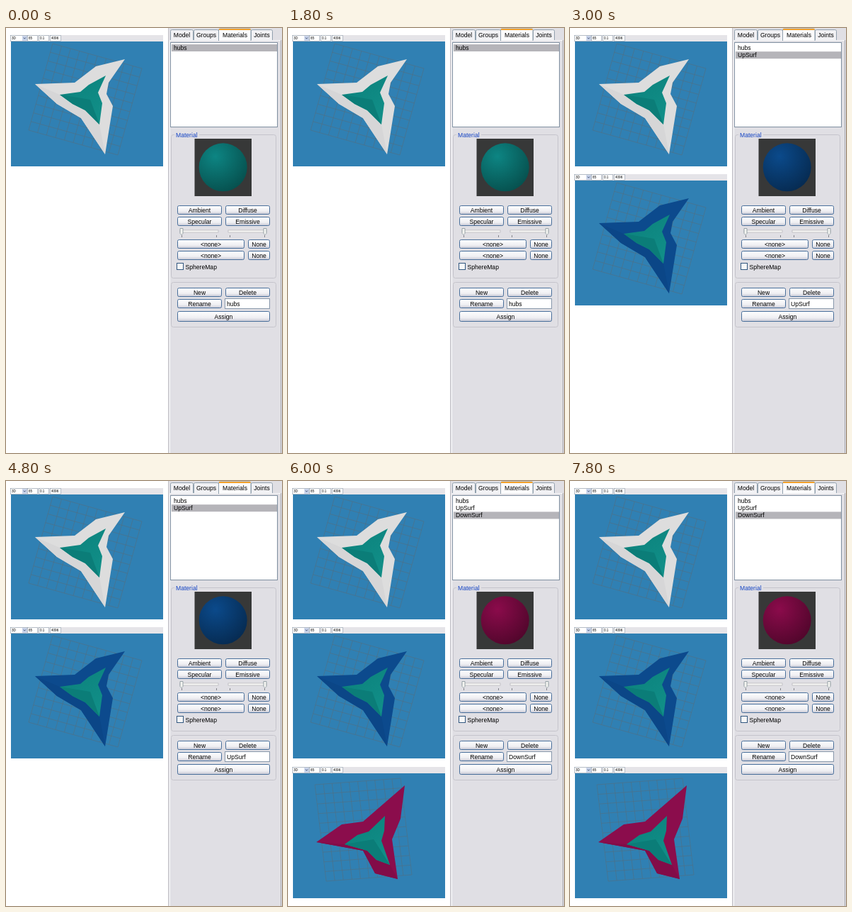
An HTML page that plays this animation: 390 px wide and 599 px high, repeating every 9000 ms.

```html
<!DOCTYPE html>
<html lang="en">
<head>
<meta charset="utf-8">
<style>
html, body { margin: 0; width: 100%; height: 100%; overflow: hidden; background: #fff; }
svg { display: block; font: 8.6px "Liberation Sans", Arial, sans-serif; }
.tiny { font-size: 4.6px; }
</style>
</head>
<body>
<svg id="stage" width="390" height="599" viewBox="0 0 390 599"></svg>
<script>
const stage = document.getElementById('stage');
const materials = [
  { name: 'hubs', color: '#0d8583', dark: '#064f4d' },
  { name: 'UpSurf', color: '#0b4a8b', dark: '#062a50' },
  { name: 'DownSurf', color: '#8b0b4b', dark: '#50062b' }
];

const rect = (x, y, w, h, fill, extra = '') =>
  `<rect x="${x}" y="${y}" width="${w}" height="${h}" fill="${fill}" ${extra}/>`;
const frame = (x, y, w, h, fill, line, r = 0) =>
  rect(x + .5, y + .5, w - 1, h - 1, fill, `stroke="${line}" rx="${r}"`);
const text = (x, y, s, extra = '') => `<text x="${x}" y="${y}" ${extra}>${s}</text>`;
const path = (d, fill, extra = '') => `<path d="${d}" fill="${fill}" ${extra}/>`;
const poly = (points, fill) => `<polygon points="${points}" fill="${fill}"/>`;

const button = (x, y, w, label, h = 13) =>
  frame(x, y, w, h, 'url(#face)', '#496f9b', 2) +
  text(x + w / 2, y + h / 2 + 3.2, label, 'text-anchor="middle"');

function slider(x, thumb) {
  return rect(x, 285, 54, 3, '#f6f6f4', 'stroke="#aaaab0" stroke-width=".6"') +
    path(`M${x + 2.5} 292v3M${x + 51.5} 292v3`, 'none', 'stroke="#85858b"') +
    path(`M${thumb - 2} 282.5h4v7l-2 2l-2 -2z`, '#f4f4f1', 'stroke="#849299" stroke-width=".8"');
}

// Square grid with ten cells, placed by its top-left corner and two sides.
function grid([x, y], [ax, ay], [bx, by]) {
  let d = '';
  for (let i = 0; i <= 10; i++) {
    const k = i / 10;
    d += `M${x + ax * k} ${y + ay * k}l${bx} ${by}M${x + bx * k} ${y + by * k}l${ax} ${ay}`;
  }
  return path(d, 'none', 'stroke="#536f80" stroke-width=".75" opacity=".8"');
}

function toolbar() {
  let s = rect(6, 10, 216, 9, '#e5e4e8');
  for (const [x, w, label] of [[6, 24, '3D'], [30, 15, '65'], [46, 15, '0.1'], [62, 16, '4096']])
    s += rect(x + .4, 10.4, w - .8, 8, '#fff', 'stroke="#8b98a6" stroke-width=".6"') +
      text(x + 2, 16.2, label, 'class="tiny"');
  return s + rect(23, 11, 6.5, 7, '#c9d4ea') +
    path('M24.8 13.5l1.5 1.7l1.5 -1.7', 'none', 'stroke="#34476b" stroke-width=".9"');
}

const view = (index, top, content) =>
  `<g class="view" data-step="${index}"><g transform="translate(0 ${top})">` +
  toolbar() + rect(7, 19, 215, 176, '#3080b3') + content + '</g></g>';

// Three blades: each has a straight edge and one with a bulge.
const upperStar = (fill, shade) =>
  grid([66, 22], [126, 35], [-34, 122]) +
  poly('41,79 97,77 127,54 168,44 145,77 142,93 151,110 140,178 106,127 72,107', fill) +
  poly('41,79 76,94 95,108 112,116 132,136 140,178 106,127 72,107', shade) +
  poly('76,94 105,90 117,80 141,67 130,91 136,106 132,136 112,116 94,107', 'url(#hub)') +
  poly('76,94 119,101 132,136 112,116 94,107', '#0b7d78');

const lowerStar = () =>
  grid([38, 35], [121, -9], [16, 136]) +
  poly('40,116 76,91 106,87 165,36 159,83 147,112 155,168 123,160 106,128', '#8b0d4c') +
  poly('40,116 80,119 112,128 125,141 144,148 155,168 123,160 106,128', '#820c48') +
  poly('80,119 98,106 114,101 137,79 136,100 132,114 144,148 125,141 112,128', 'url(#hub)') +
  poly('80,119 121,112 144,148 125,141 112,128', '#0b7d78');

function panel() {
  let s = rect(229, 0, 161, 599, '#e0dfe4') +
    path('M229.5 0V599', 'none', 'stroke="#c3c2c8"') +
    path('M231.5 599V17.5H388.5V599', 'none', 'stroke="#f8f8fa"') +
    path('M388.5 17V599', 'none', 'stroke="#a9a9b1"');
  for (const [x, w, label] of [[232, 33, 'Model'], [265, 36, 'Groups'], [346, 31, 'Joints']])
    s += path(`M${x + .5} 17V4.5q0 -2 2 -2H${x + w - 2.5}q2 0 2 2V17`, '#f1f1f4', 'stroke="#91a0ad"') +
      text(x + w / 2, 13, label, 'text-anchor="middle"');
  s += path('M300.5 18V3q0 -2 2 -2H344q2 0 2 2V18', '#fbfbfc', 'stroke="#91a0ad"') +
    path('M301 2H345.5', 'none', 'stroke="#f2a12b" stroke-width="2"') +
    text(323.5, 13, 'Materials', 'text-anchor="middle"');

  s += frame(232, 20, 152, 120, '#fff', '#7f8fa0') +
    rect(234, 23, 149, 10, '#b5b4b9', 'id="selection"');
  materials.forEach((m, i) => {
    s += text(237, 31 + i * 10.2, m.name, `class="view" data-step="${i}"`);
  });

  s += frame(233, 150, 149, 203, 'none', '#c5c4cb', 3) +
    rect(238, 148, 35, 6, '#e0dfe4') + text(240, 153.5, 'Material', 'fill="#1545c4"') +
    rect(266.5, 156, 80.5, 81, '#373838') +
    '<circle cx="306.7" cy="196.3" r="34" fill="url(#ball)"/>' +
    button(242, 250, 63, 'Ambient') + button(310, 250, 63, 'Diffuse') +
    button(242, 266, 63, 'Specular') + button(310, 266, 63, 'Emissive') +
    slider(246, 248) + slider(314, 366);
  for (const y of [298, 314])
    s += button(242, y, 95, '&lt;none&gt;') + button(342, y, 31, 'None');
  s += frame(241, 331, 10, 10, '#f8f8f7', '#315780') + text(253.5, 340, 'SphereMap');

  return s + frame(233, 358, 149, 64, 'none', '#c5c4cb', 3) +
    button(242, 366, 63, 'New') + button(310, 366, 63, 'Delete') +
    button(242, 382, 63, 'Rename') +
    frame(309, 381, 64, 15, '#fff', '#8797aa') + text(312, 391.5, '', 'id="field"') +
    button(242, 399, 131, 'Assign', 15);
}

stage.innerHTML = `<defs>
  <linearGradient id="face" x2="0" y2="1">
    <stop stop-color="#fff"/><stop offset=".65" stop-color="#eeeef2"/><stop offset="1" stop-color="#c5c6d3"/>
  </linearGradient>
  <linearGradient id="hub" x2=".7" y2="1">
    <stop stop-color="#0b807b"/><stop offset="1" stop-color="#118f88"/>
  </linearGradient>
  <radialGradient id="ball" cx=".34" cy=".27" r=".8">
    <stop id="lit"/><stop id="dim" offset="1"/>
  </radialGradient>
</defs>` +
  view(0, 0, upperStar('#dddddd', '#d6d6d7')) +
  view(1, 196, upperStar('#0c4a8d', '#0b4687')) +
  view(2, 393, lowerStar()) + panel();

const byId = id => document.getElementById(id);
const views = document.querySelectorAll('.view');

function draw() {
  const step = Math.floor(performance.now() % 9000 / 3000);
  const { name, color, dark } = materials[step];
  views.forEach(v => v.setAttribute('visibility', v.dataset.step <= step ? 'visible' : 'hidden'));
  byId('selection').setAttribute('y', 23 + step * 10.2);
  byId('field').textContent = name;
  byId('lit').setAttribute('stop-color', color);
  byId('dim').setAttribute('stop-color', dark);
  requestAnimationFrame(draw);
}
draw();
</script>
</body>
</html>
```
